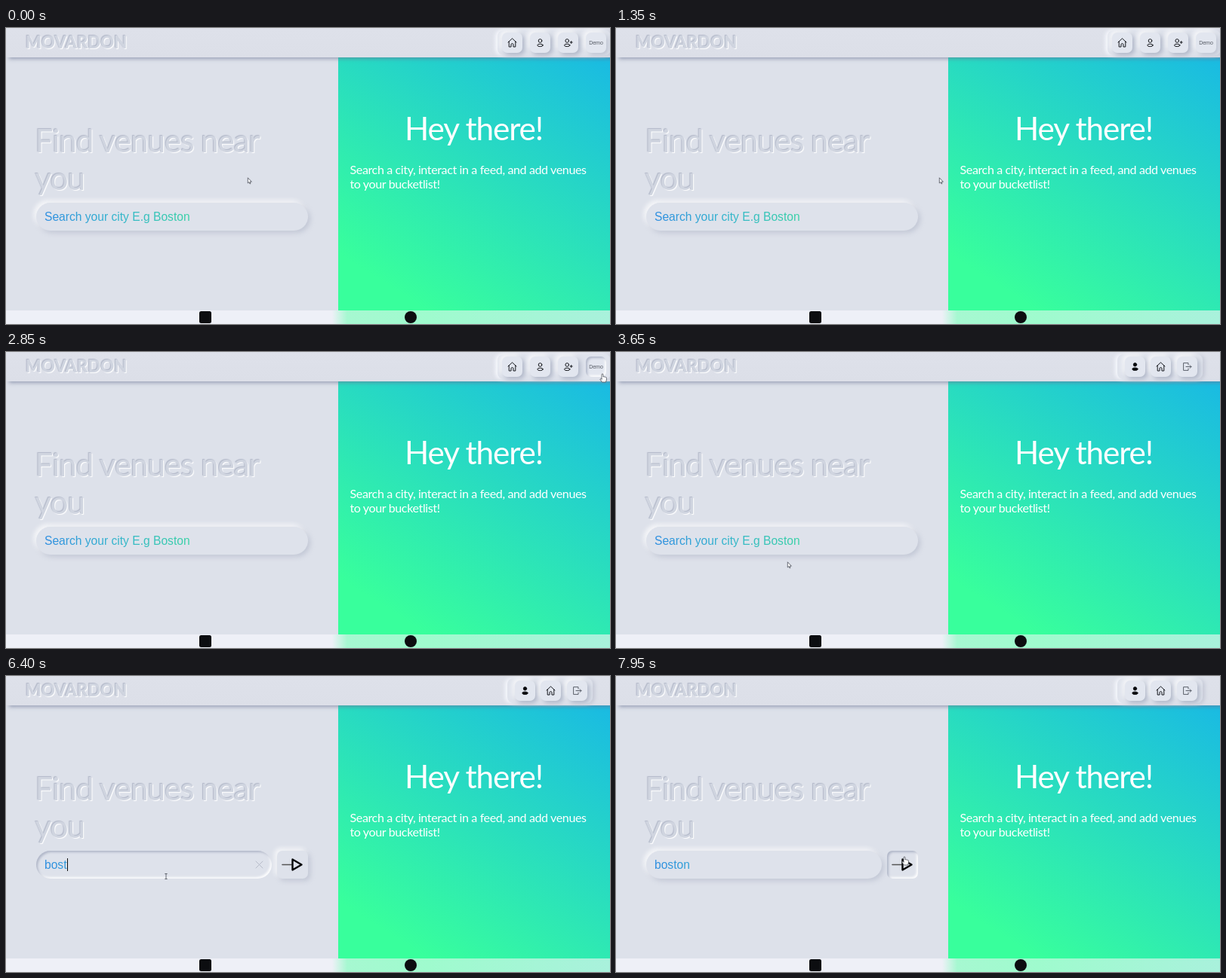
An HTML page that plays this animation: 800x393 px, repeating every 8000 ms.

```html
<!DOCTYPE html>
<html lang="en">
<head>
<meta charset="utf-8">
<title>Venue search</title>
<style>
html, body { margin: 0; width: 100%; height: 100%; overflow: hidden; background: #dde1ea; }
#stage { position: relative; width: 800px; height: 393px; overflow: hidden; background: #dde1ea; font-family: Lato, "Open Sans", sans-serif; }
#stage div, #stage svg { position: absolute; box-sizing: border-box; white-space: nowrap; }
svg { overflow: visible; fill: none; stroke: #15171c; stroke-linecap: round; stroke-linejoin: round; }

#panel { left: 440px; top: 39px; width: 360px; height: 354px; background: linear-gradient(33deg, #38ff9c 16%, #1abbe2 99%); color: #fff; }
.title { font-size: 42.3px; line-height: 50px; letter-spacing: -1.15px; }
#hey { left: 0; top: 69px; width: 359px; text-align: center; }
#about { left: 15.5px; top: 139px; font-size: 16.1px; line-height: 19px; letter-spacing: -.4px; }

#head { left: 3px; top: -4px; width: 810px; height: 43px; background: #dcdfe8; box-shadow: 1px 2px 5px rgb(105 115 145 / .6); }
#headFill { left: 0; top: 0; width: 800px; height: 39px; background: linear-gradient(#dee1ea, #dcdfe8); }
.emboss { color: #d0d5e0; text-shadow: -1px -1px 1px #b3b9c9, 1px 1px 1px #fff; }
#logo { left: 26px; top: 6.3px; font-size: 22.1px; line-height: 26px; font-weight: 800; }
#find { left: 38.5px; top: 124px; }

.nav { top: 3px; height: 33px; border-radius: 8px; background: #dfe3ec; box-shadow: -3px 0 5px #f6f8fd, 3px 1px 5px #c6cad7; }
.soft {
  --k: 0;
  --a: .42;
  background: #dee2eb;
  box-shadow:
    3px 3px 6px rgb(158 165 186 / calc(var(--a) * (1 - var(--k)))),
    -3px -3px 6px rgb(255 255 255 / calc(.8 * (1 - var(--k)))),
    inset 2px 2px 3px rgb(158 165 186 / calc(.7 * var(--k))),
    inset -2px -2px 3px rgb(255 255 255 / calc(.9 * var(--k)));
}
.btn { --a: .75; top: 6px; width: 27px; height: 27px; border-radius: 7px; background: #e2e6ef; }
.btn svg { left: 7px; top: 6.5px; width: 13px; height: 13px; stroke-width: 1; }
#demo { --a: .5; font: 7px/27px "Liberation Sans", Arial, sans-serif; text-align: center; color: #555a64; }

#field { left: 40px; top: 232px; width: 360px; height: 37px; border-radius: 19px; }
#words { left: 51px; top: 240.6px; width: 194px; height: 20px; font: 15.62px/20px "Liberation Sans", Arial, sans-serif; color: transparent;
  background: linear-gradient(90deg, #2f8ee0, #35b2cf 45%, #3ad2a6); -webkit-background-clip: text; background-clip: text; }
#caret { left: 51px; top: 242px; width: 1px; height: 17px; background: #111; }
#clear { left: 330px; top: 245px; width: 11px; height: 11px; stroke: #b7bcc9; stroke-width: 1; }
#go { left: 359px; top: 232px; width: 41px; height: 37px; border-radius: 7px; }

#foot { left: 0; top: 375px; width: 800px; height: 18px; background: linear-gradient(90deg, #eef0f7 432px, #a6f8d1 452px, #9ffbce 560px, #a9f1dc 800px); }
.mark { top: 1px; width: 16px; height: 16px; background: #0c0d10; }
#pointer svg { left: 0; top: 0; width: 1px; height: 1px; stroke: #4b4f58; stroke-width: .8; }
</style>
</head>
<body>
<div id="stage">
  <div id="panel">
    <div id="hey" class="title">Hey there!</div>
    <div id="about">Search a city, interact in a feed, and add venues<br>to your bucketlist!</div>
  </div>
  <div id="head"></div>
  <div id="headFill"></div>
  <div id="logo" class="emboss">MOVARDON</div>

  <div id="guest">
    <div class="nav" style="left:651px;width:150px"></div>
    <div class="btn soft" style="left:657px" data-icon="home"></div>
    <div class="btn soft" style="left:694px" data-icon="user"></div>
    <div class="btn soft" style="left:731px" data-icon="join"></div>
    <div class="btn soft" style="left:768px" id="demo">Demo</div>
  </div>
  <div id="member">
    <div class="nav" style="left:664px;width:113px"></div>
    <div class="btn soft" style="left:674px" data-icon="solid"></div>
    <div class="btn soft" style="left:708px" data-icon="home"></div>
    <div class="btn soft" style="left:743px" data-icon="leave"></div>
  </div>

  <div id="find" class="emboss title">Find venues near<br>you</div>
  <div id="field" class="soft"></div>
  <div id="words"></div>
  <svg id="clear"><path d="M1 1L10 10M10 1L1 10"/></svg>
  <div id="caret"></div>
  <div id="go" class="soft">
    <svg style="left:0;top:0;width:41px;height:37px">
      <path d="M7 18.5H20" stroke="#555" stroke-width="1.6"/>
      <path d="M20.5 11.5L32.5 18.5L20.5 25.5Z" stroke="#08090b" stroke-width="2.4"/>
    </svg>
  </div>

  <div id="foot">
    <div class="mark" style="left:256px;border-radius:2.5px"></div>
    <div class="mark" style="left:528px;border-radius:50%"></div>
  </div>

  <div id="pointer">
    <svg data-shape="arrow"><path fill="#fff" d="M.3 .2V7L1.9 5.6L3 8L4 7.5L3 5.2H5Z"/></svg>
    <svg data-shape="beam"><path d="M-1.3 -3.4H1.3M0 -3.4V3.4M-1.3 3.4H1.3"/></svg>
    <svg data-shape="hand"><path fill="#fff" d="M-1 5.5V.6Q0 -.8 1 .6V4Q2 3 2.8 4.2Q3.8 3.4 4.4 4.6Q5.4 4.2 5.4 5.6V8L4.4 11H-.6L-3.2 7Q-3 5.6 -1 7Z"/></svg>
  </div>
</div>

<script>
const $ = id => document.getElementById(id);
const LOOP = 8000;

const icons = {
  home: '<path d="M1 6L6.5 .9L12 6M2.2 5V12H5V8.4Q6.5 6.6 8 8.4V12H10.8V5"/>',
  user: '<circle cx="6.5" cy="4" r="2.3"/><ellipse cx="6.5" cy="9.9" rx="3.7" ry="1.7"/>',
  join: '<circle cx="5.2" cy="4" r="2.3"/><ellipse cx="5.2" cy="9.9" rx="3.7" ry="1.7"/><path d="M9.2 6H12.2M10.7 4.5V7.5"/>',
  solid: '<g fill="#08090b"><circle cx="6.5" cy="3.8" r="2.2"/><ellipse cx="6.5" cy="9.7" rx="3.7" ry="1.8"/></g>',
  leave: '<g stroke="#5b606b"><path d="M8 4V1.6H1.6V11.4H8V9M5 6.5H12M10 4.5L12 6.5L10 8.5"/></g>'
};
for (const el of document.querySelectorAll('[data-icon]'))
  el.innerHTML = `<svg>${icons[el.dataset.icon]}</svg>`;

// time, x, y
const path = [
  [0, 320, 199], [50, 320, 199], [450, 304, 204], [850, 331, 199],
  [1200, 331, 199], [1350, 428, 199], [2000, 742, 52], [2400, 780, 26],
  [2850, 790, 29], [3000, 790, 29], [3350, 430, 185], [3650, 227, 279],
  [3900, 227, 279], [4300, 216, 262], [4700, 212, 266],
  [6950, 212, 266], [7350, 310, 256], [7750, 382, 240], [LOOP, 382, 240]
];
const typed = [[5600, 'b'], [5850, 'bo'], [6100, 'bos'], [6400, 'bost'], [6550, 'bosto'], [6700, 'boston']];
const LOGIN = 2975, FOCUS = 5150, BLUR = 7800, BLINK = 530;

const pen = document.createElement('canvas').getContext('2d');
pen.font = '15.62px "Liberation Sans", Arial, sans-serif';

function place(t) {
  let i = 1;
  while (i < path.length - 1 && path[i][0] < t) i++;
  const [t0, x0, y0] = path[i - 1], [t1, x1, y1] = path[i];
  const u = (t - t0) / (t1 - t0);
  const e = u + (u * u * (3 - 2 * u) - u) * .6;
  return [x0 + (x1 - x0) * e, y0 + (y1 - y0) * e];
}
const inside = ([x, y], l, t, r, b) => x >= l && x <= r && y >= t && y <= b;
const show = (el, on) => { el.style.visibility = on ? 'visible' : 'hidden'; };
const press = (el, on) => el.style.setProperty('--k', on ? 1 : 0);

function draw(t) {
  const at = place(t);
  const member = t >= LOGIN;
  const key = typed.filter(k => k[0] <= t).pop();
  const text = key ? key[1] : '';
  const right = text ? 352 : 400;
  const focus = t >= FOCUS && t < BLUR;
  const onField = inside(at, 40, 232, right, 269);
  const onGo = text && inside(at, 359, 232, 400, 269);
  const onDemo = !member && inside(at, 768, 6, 800, 33);

  show($('guest'), !member);
  show($('member'), member);
  press($('demo'), onDemo);
  press($('field'), onField || focus);
  press($('go'), onGo);
  $('field').style.width = right - 40 + 'px';
  show($('go'), text);
  show($('clear'), text && (onField || focus));
  $('words').textContent = text || 'Search your city E.g Boston';

  const since = t - (key ? key[0] : FOCUS);
  show($('caret'), focus && Math.floor(since / BLINK) % 2 === 0);
  $('caret').style.left = 51 + pen.measureText(text).width + 'px';

  const shape = onField ? 'beam' : onGo || onDemo ? 'hand' : 'arrow';
  for (const s of $('pointer').children) show(s, s.dataset.shape === shape);
  $('pointer').style.transform = `translate(${Math.round(at[0])}px, ${Math.round(at[1])}px)`;
}

const start = performance.now();
function tick() {
  draw((performance.now() - start) % LOOP);
  requestAnimationFrame(tick);
}
tick();
</script>
</body>
</html>
```
